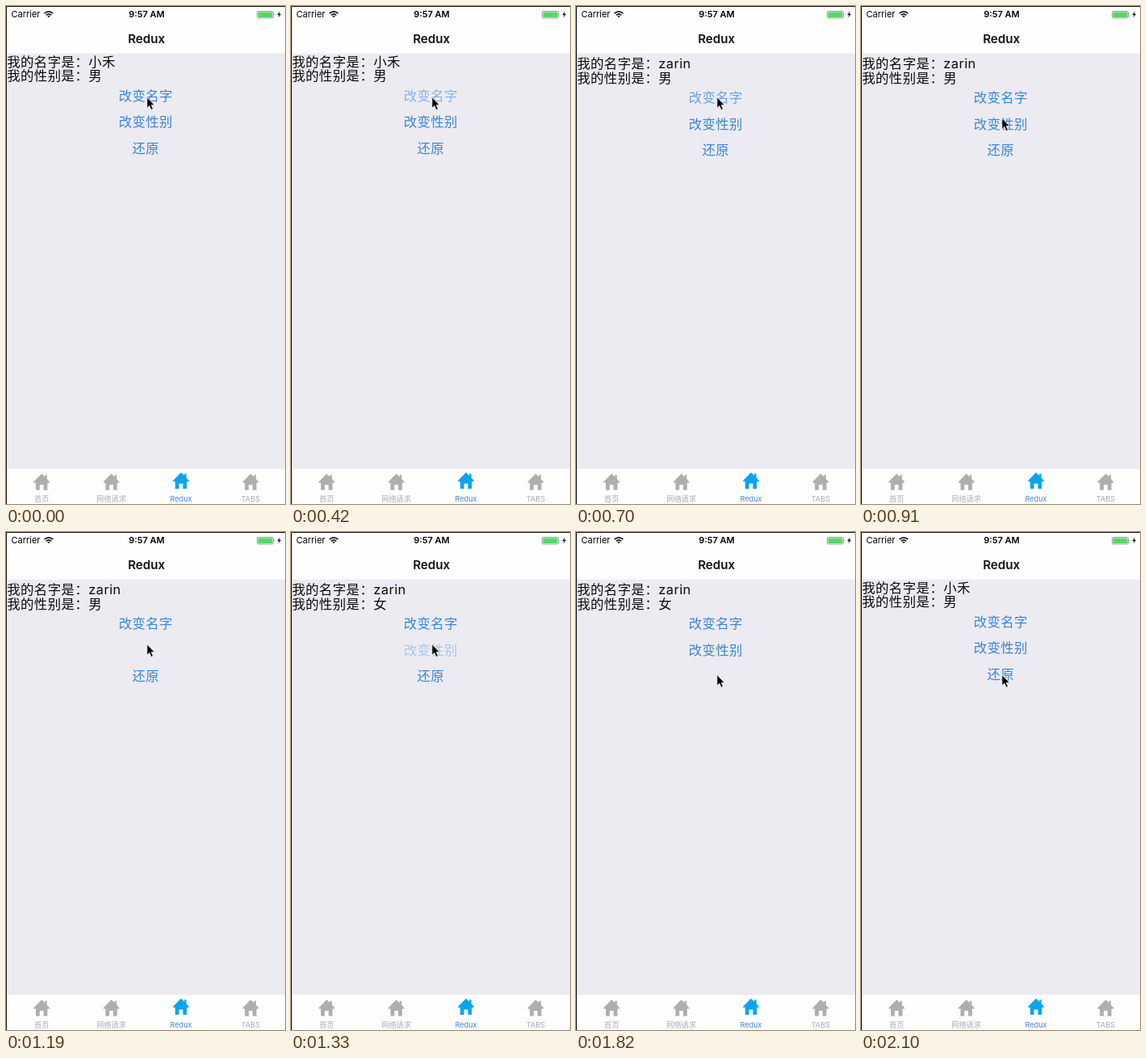
An HTML page that plays this animation: 346 px wide and 616 px high, repeating every 2.17 s.

```html
<!DOCTYPE html>
<html lang="zh-CN">
<head>
<meta charset="utf-8">
<style>
  html, body { margin: 0; width: 100%; height: 100%; overflow: hidden; background: #fff; }
  svg { display: block; width: 100%; height: 100%; }
  text { font-family: Inter, "Noto Sans CJK SC", "Noto Sans CJK", sans-serif; font-size: 16.4px; }
  .mid { text-anchor: middle; }
  .row { letter-spacing: .45px; fill: #0c0c0c; }
  .btn { letter-spacing: .35px; fill: #3a85d6; }
  .tab { fill: #aeaeae; }
  .tab text { font-size: 9.2px; fill: #ababb4; }
  .tab.on { fill: #0aa4ee; }
  .tab.on text { fill: #4d86d8; }
</style>
</head>
<body>
<svg viewBox="0 0 346 616">
  <defs>
    <path id="house" fill-rule="evenodd" d="M0 0L4.2 4.1V1.5H6.6V6.5L9.8 10V11.3H7.2V20.3H2.4V13.8H-2.4V20.3H-7.2V11.3H-9.8V10Z"/>
  </defs>
  <rect width="346" height="616" fill="#fefefe"/>
  <rect y="58.6" width="346" height="513.4" fill="#ecebf2"/>

  <text x="6.5" y="14.2" style="font-size:11px">Carrier</text>
  <g fill="none" stroke="#111" stroke-width="1.6">
    <path d="M47.6 9.2Q53 4.4 58.4 9.2M49.8 11.3Q53 8.5 56.2 11.3"/>
    <path d="M53 14.3L51.3 12.5Q53 11.2 54.7 12.5Z" fill="#111" stroke="none"/>
  </g>
  <text class="mid" x="174.5" y="14.2" style="font-size:11px;font-weight:600">9:57 AM</text>
  <rect x="311.5" y="6.5" width="20" height="8.5" rx="1.5" fill="#fff" stroke="#777" stroke-width=".7"/>
  <rect x="312.5" y="7.5" width="18" height="6.5" rx=".6" fill="#56d669"/>
  <path d="M332.6 9.2q1.4 1.5 0 3z" fill="#777"/>
  <path d="M339.8 6.4L336.4 11H338.6L337.6 14.6L341.2 9.8H339Z" fill="#111"/>
  <text class="mid" x="174.2" y="45.7" fill="#111" style="font-size:15.2px;font-weight:600">Redux</text>

  <text id="name" class="row" x="1.2"></text>
  <text id="sex" class="row" x="1.2"></text>
  <g id="buttons">
    <text class="mid btn" x="173.2" y="117">改变名字</text>
    <text class="mid btn" x="173.2" y="149.3">改变性别</text>
    <text class="mid btn" x="173.2" y="181.7">还原</text>
  </g>

  <path d="M0 572.2H346" stroke="#e4e4e8" stroke-width=".6"/>
  <g id="tabs"></g>
  <path d="M.5 616V.5H346" fill="none" stroke="#111"/>
  <path id="cursor" d="M0 0V13.2L3 10.4L5.2 15.4L7.5 14.4L5.3 9.6H9.3Z" fill="#000" stroke="#fff" stroke-width=".7"/>
</svg>
<script>
const LOOP = 2170, STEP = 70;
const get = id => document.getElementById(id);
const buttons = [...get('buttons').children];

get('tabs').innerHTML = ['首页', '网络请求', 'Redux', 'TABS'].map((label, i) => {
  const x = 44.2 + 86.4 * i, on = i === 2;
  return `<g class="tab ${on ? 'on' : ''}"><use href="#house" x="${x}" y="${on ? 577 : 578.4}"/>` +
    `<text class="mid" x="${x}" y="613">${label}</text></g>`;
}).join('');

// press and release time of each button
const taps = [[350, 545], [1040, 1225], [1660, 1855]];

function ease(t, from, to) {
  const p = Math.min(1, Math.max(0, (t - from) / (to - from)));
  return p < .5 ? 2 * p * p : 1 - 2 * (1 - p) ** 2;
}

function draw(t) {
  const renamed = t >= taps[0][1] && t < taps[2][1];
  const female = t >= taps[1][1] && t < taps[2][1];
  const shift = renamed ? 2.3 : 0;

  get('name').textContent = '我的名字是：' + (renamed ? 'zarin' : '小禾');
  get('sex').textContent = '我的性别是：' + (female ? '女' : '男');
  get('name').setAttribute('y', 74.7 + shift * .8);
  get('sex').setAttribute('y', 92.2 + shift);
  get('buttons').setAttribute('transform', `translate(0 ${shift})`);
  buttons.forEach((b, i) => {
    const [down, up] = taps[i];
    b.style.opacity = 1 - ease(t, down, down + 150) + ease(t, up, up + 245);
  });

  const y = 113 + 26 * ease(t, 700, 910) + 37.8 * ease(t, 1330, 1540);
  get('cursor').setAttribute('transform', `translate(174.9 ${y})`);
}

const start = performance.now();
function tick() {
  const t = (performance.now() - start) % LOOP;
  draw(Math.floor(t / STEP) * STEP);
  requestAnimationFrame(tick);
}
tick();
</script>
</body>
</html>
```
